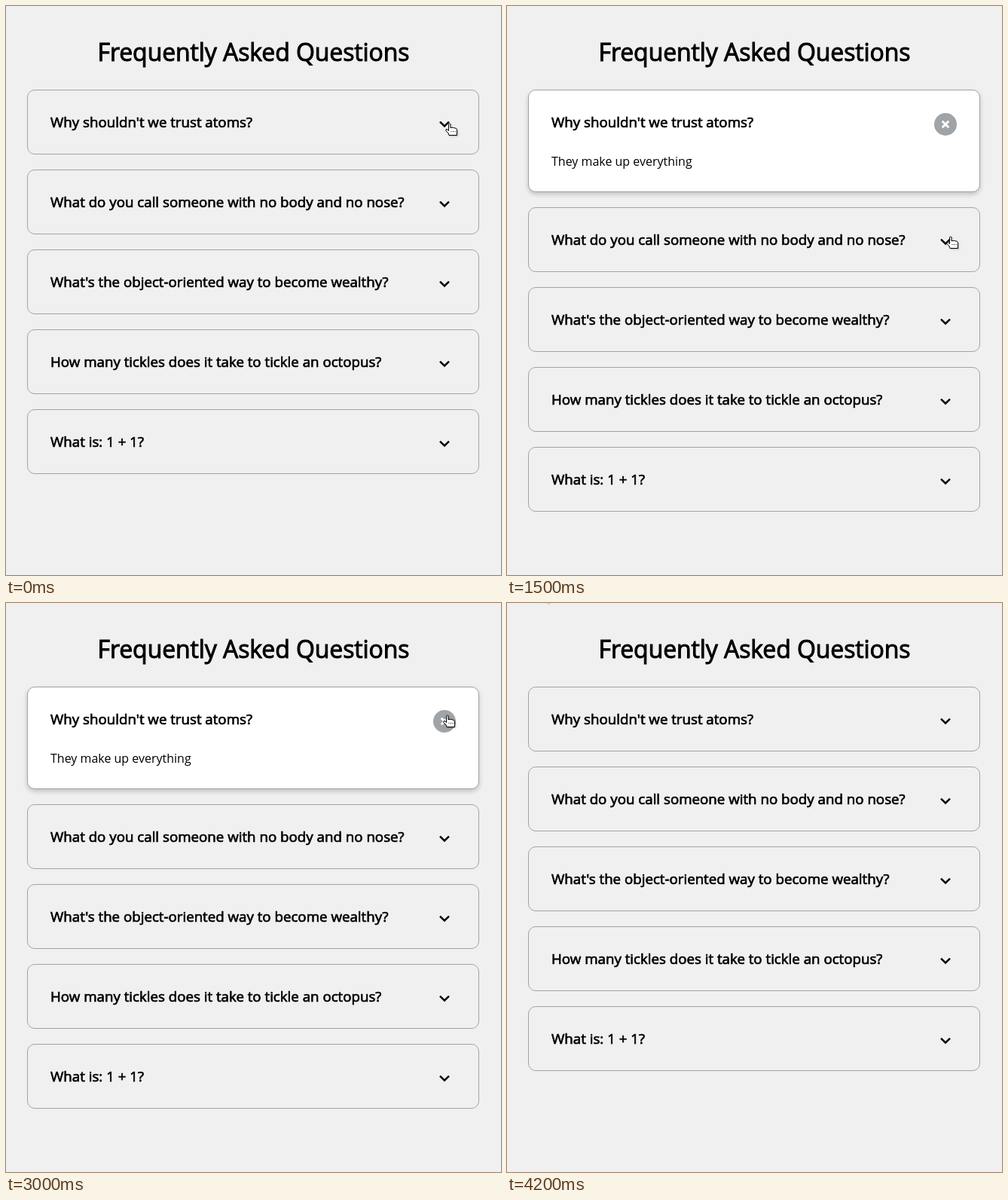
Write an HTML page that moves like this. It is 657 px wide and 755 px high and loops after 4300 ms.

```html
<!DOCTYPE html>
<html lang="en">
<head>
<meta charset="utf-8">
<title>Frequently Asked Questions</title>
<style>
  html, body { margin: 0; width: 100%; height: 100%; overflow: hidden; }
  body { position: relative; background: #f0f0f0; color: #000; font: 16px/20px "Open Sans", sans-serif; }
  h1, h2, p { margin: 0; font-weight: 400; }
  h1 { box-sizing: border-box; width: 657px; height: 111px; padding-top: 41px; text-align: center;
       font-size: 32px; line-height: 40px; letter-spacing: -.1px; -webkit-text-stroke: 1px; }
  h2 { font-size: 18.72px; line-height: 24px; -webkit-text-stroke: .7px; }
  p { display: none; margin-top: 30px; }
  .card { --a: 0; --shade: 0 3px 6px rgba(0, 0, 0, calc(.1 * var(--a)));
          position: relative; box-sizing: border-box; width: 600px; margin: 0 0 20px 28px; padding: 30px;
          border: 1px solid #9fa4a8; border-radius: 10px; white-space: nowrap;
          background: rgba(255, 255, 255, var(--a)); box-shadow: var(--shade), var(--shade); }
  svg { position: absolute; fill: none; overflow: visible; }
  .toggle { right: 30px; top: 30px; width: 30px; height: 30px; }
  .down { stroke: #000c14; stroke-width: 2.5; }
  .close { display: none; stroke: #fff; stroke-width: 2.9; }
  .open p, .open .close { display: block; }
  .open .down { display: none; }
  #cursor { left: 0; top: 0; width: 20px; height: 20px; fill: #fff; stroke: #000; stroke-linejoin: round;
            filter: drop-shadow(1px 1px 1px rgba(0, 0, 0, .25)); }
</style>
</head>
<body>
<h1>Frequently Asked Questions</h1>
<svg id="cursor">
  <path id="arrow" d="M.5 .5v16l3.7-3.5 2.6 5.6 2.4-1.1-2.6-5.4h5z"/>
  <g id="hand" transform="translate(-5 0)">
    <path d="M4.5 10.5V1.8q1.2-1.8 2.4 0v4.7q4-.6 7 .8 1.6.5 1.6 2.4v6.8H5l-.8-2.6L1 10.5q-.8-2 1-2.2z"/>
    <path d="M7.5 11.5h6" stroke-dasharray="1 1.5"/>
  </g>
</svg>
<script>
const LOOP = 4300, STEP = 100;
const items = [
  { q: "Why shouldn't we trust atoms?", a: "They make up everything", open: 400, shut: 3100 },
  { q: "What do you call someone with no body and no nose?", a: "Nobody knows.", open: 1600, shut: 2400 },
  { q: "What's the object-oriented way to become wealthy?" },
  { q: "How many tickles does it take to tickle an octopus?" },
  { q: "What is: 1 + 1?" }
];
// Pointer hotspot: time, x, y
const track = [
  [0, 588, 155], [1000, 588, 155], [1500, 588, 305], [1600, 588, 305], [1900, 586, 309],
  [2400, 586, 309], [3000, 585, 148], [3100, 585, 148], [3400, 188, 8], [3500, 145, -2],
  [4000, 47, -21], [4100, 47, -21], [4200, 47, -18.8], [LOOP, 47, -18.8]
];
const cursor = document.getElementById("cursor");
const arrow = document.getElementById("arrow");
const hand = document.getElementById("hand");

const cards = items.map(({ q, a = "" }) => {
  const card = document.createElement("div");
  card.className = "card";
  card.innerHTML = `<h2>${q}</h2><p>${a}</p>
    <svg class="toggle"><path class="down" d="M9 11.6l6 5.9 6-5.9"/>
    <g class="close"><circle cx="15" cy="15" r="15" fill="#9fa4a8" stroke="none"/>
    <path d="M10.7 10.7l8.6 8.6m0-8.6l-8.6 8.6"/></g></svg>`;
  document.body.insertBefore(card, cursor);
  return card;
});

const clamp = v => Math.min(1, Math.max(0, v));
const smooth = p => p * p * (3 - 2 * p);
// Card fade lasts 300 ms and is already under way on the first visible step.
const fade = dt => dt < 0 ? 0 : 1 - (1 - clamp((dt + 90) / 300)) ** 1.75;

function pointer(t) {
  const i = track.findIndex(k => k[0] > t);
  const [t0, x0, y0] = track[i - 1], [t1, x1, y1] = track[i];
  const p = smooth((t - t0) / (t1 - t0));
  return [x0 + (x1 - x0) * p, y0 + (y1 - y0) * p];
}

function draw(t) {
  const [x, y] = pointer(t);
  let top = 111, onToggle = false;
  items.forEach(({ open, shut }, i) => {
    const isOpen = t >= open && t < shut;
    cards[i].classList.toggle("open", isOpen);
    cards[i].style.setProperty("--a", open ? fade(t - open) - fade(t - shut) : 0);
    onToggle ||= Math.hypot(x - 582, y - top - 46) < 16;
    top += isOpen ? 156 : 106;
  });
  cursor.style.transform = `translate(${x}px, ${y}px)`;
  hand.style.display = onToggle ? "" : "none";
  arrow.style.display = onToggle ? "none" : "";
}

const start = performance.now();
function tick() {
  const t = (performance.now() - start) % LOOP;
  draw(Math.floor(t / STEP) * STEP);
  requestAnimationFrame(tick);
}
tick();
</script>
</body>
</html>
```
